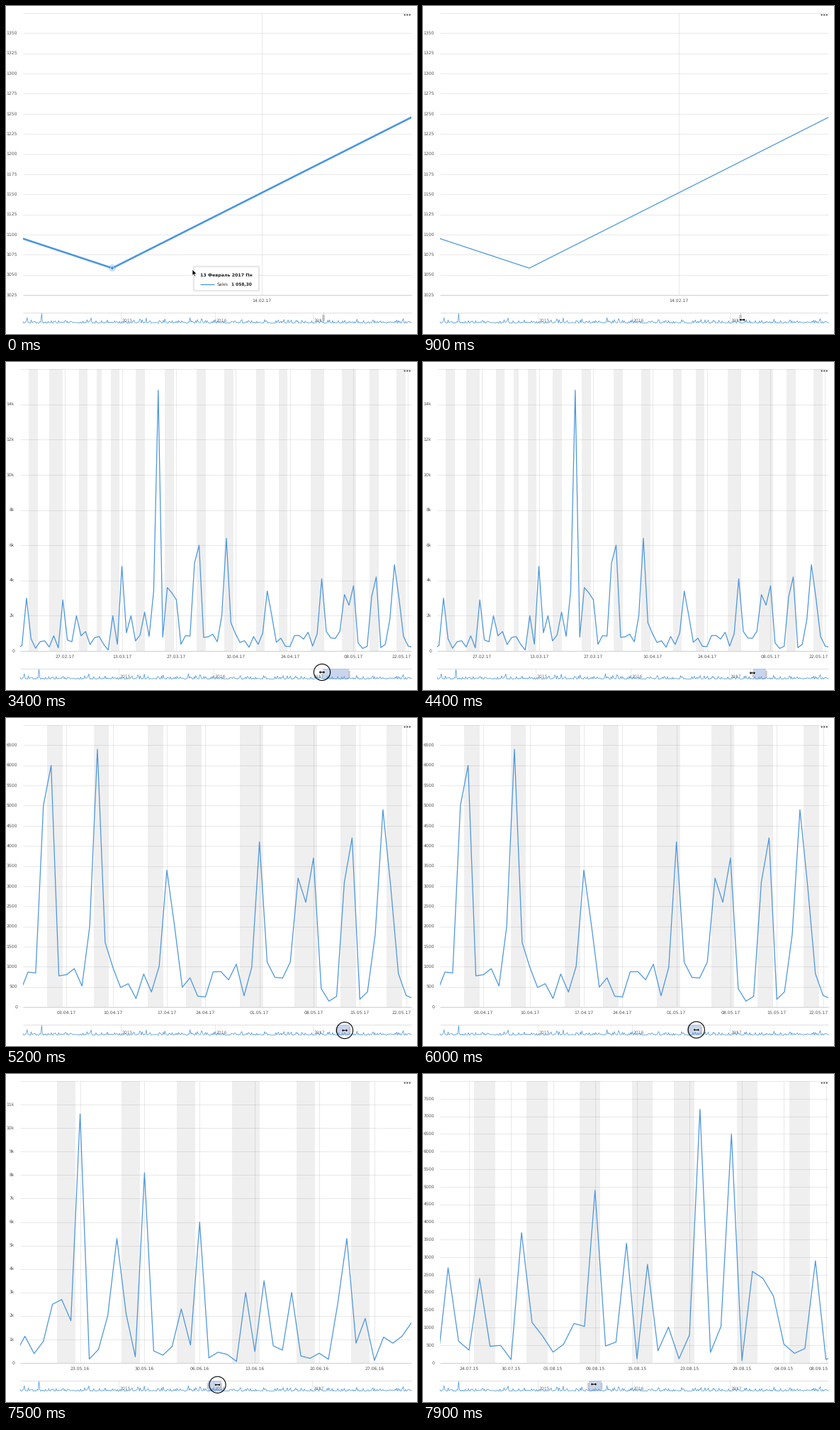
A matplotlib script for the animation above (8000 ms loop, 580x462 px).

```python
import matplotlib.pyplot as plt
import numpy as np
from matplotlib.animation import FuncAnimation
from matplotlib.collections import LineCollection
from matplotlib.patches import Circle, FancyBboxPatch, Polygon, Rectangle

W, H, DPI = 580, 462, 100
FRAMES, STEP = 80, 100
TOP, BASE, RIGHT = 10, 407, 572
NAV_TOP, NAV_BASE = 432, 447
BLUE, GRID, BAND = "#4c96dc", (0, 0, 0, 0.085), "#efefef"
PX = 72 / DPI

plt.rcParams.update({"font.family": "DejaVu Sans", "text.hinting": "no_hinting"})
fig = plt.figure(figsize=(W / DPI, H / DPI), dpi=DPI, facecolor="white")
ax = fig.add_axes([0, 0, 1, 1])


def daily_sales(count, peaks, seed):
    """Quiet seeded days with marked busy ones, peaks in hundreds."""
    values = np.random.default_rng(seed).uniform(50, 1150, count)
    for day, hundreds in peaks.items():
        values[day] = hundreds * 100
    return values


def view(start, left, values, x0, dx, step, rows, ticks, first, low=0,
         gaps=None, mondays=(), holidays=(), kilo=False):
    """One zoom state; ticks, mondays and holidays are point indices."""
    gap = (BASE - TOP) / rows
    gaps = 7 * np.arange(len(ticks)) if gaps is None else gaps
    labels = []
    for days in gaps:
        y, m, d = str(np.datetime64(first) + int(days)).split("-")
        labels.append(f"{d}.{m}.{y[2:]}")
    off = [m - k for m in mondays for k in (1, 2)] + list(holidays)
    return dict(start=start, left=left, low=low, step=step, rows=rows, gap=gap, kilo=kilo,
                x=x0 + dx * np.arange(len(values)),
                y=BASE - (np.array(values) - low) * gap / step,
                ticks=[(x0 + dx * i, s) for i, s in zip(ticks, labels)],
                off=[(x0 + dx * (i - 0.5), x0 + dx * (i + 0.5)) for i in off])


SPRING = daily_sales(88, {
    2: 30, 10: 29, 13: 20, 21: 20, 23: 48, 25: 20, 28: 22, 30: 34, 31: 148,
    33: 36, 34: 33, 35: 29, 39: 50, 40: 60, 45: 20, 46: 64, 47: 16, 55: 34,
    56: 20, 67: 41, 72: 32, 73: 26, 74: 37, 78: 31, 79: 42, 82: 18, 83: 49,
    84: 30, 87: 2}, 3)
JUNE = daily_sales(44, {
    4: 25, 5: 27, 6: 18, 7: 106, 10: 20, 11: 53, 12: 21, 14: 81, 18: 23,
    20: 60, 25: 30, 27: 35, 30: 30, 35: 25, 36: 53, 38: 19, 43: 17}, 8)
AUGUST = daily_sales(39, {
    0: 0, 1: 27, 4: 24, 8: 37, 15: 49, 18: 34, 20: 28, 25: 72, 28: 65, 30: 26,
    31: 24, 32: 19, 36: 29, 37: 1}, 5)
MONDAYS = np.array([5, 10.5, 16, 23, 28.5, 35, 42, 48, 55, 60, 67, 74, 80, 86])
MAY = np.array([67, 74])
LATE = MONDAYS[6:] - 36
JUNE_MONDAYS = [7, 14, 20, 26, 33, 39]

VIEWS = [
    view(0, 24, [1181, 1058.3, 1245.5], -272, 422, 25, 14, [1.5], "2017-02-14", low=1025),
    view(2400, 20, SPRING, 16.1, 6.41, 2000, 8, MONDAYS[1::2], "2017-02-27",
         gaps=14 * np.arange(7), mondays=MONDAYS, holidays=[7.5, 18, *MAY], kilo=True),
    view(4500, 24, SPRING[36:], 20.1, 10.89, 500, 14, LATE, "2017-04-03",
         mondays=LATE, holidays=MAY - 36),
    view(6200, 20, JUNE, 13.7, 12.98, 1000, 12, JUNE_MONDAYS, "2016-05-23",
         mondays=JUNE_MONDAYS, holidays=[26], kilo=True),
    view(7800, 24, AUGUST, 20.6, 14.81, 500, 16, [3, 7, 11, 15, 19, 24, 29, 33, 37],
         "2015-07-24", gaps=[0, 6, 12, 16, 22, 30, 36, 42, 46],
         mondays=[6, 11, 16, 21, 25, 31, 36]),
]

# start, end, x, y, dragged part of the window
MOVES = [
    (0, 600, 451, 444, ""), (800, 1000, 450, 438, ""), (1400, 1900, 486.5, 438, "r"),
    (2200, 3100, 446, 437, ""), (3400, 3800, 473, 437.5, "l"), (4000, 4100, 465, 438, "l"),
    (4400, 5000, 478, 440, ""), (5400, 6200, 355, 439, "lr"), (6900, 7200, 352, 438.5, "lr"),
    (7300, 7700, 245, 437, "lr"), (7700, 7900, 241, 437, "")]
PRESSED = [(1200, 2100), (3400, 4200), (5200, 6200), (6900, 7800)]

nav_u = np.linspace(0, 1, 480)
nav_h = np.clip(np.random.default_rng(14).gamma(1.3, 1.3, nav_u.size), 0.3, 8)
nav_h[round(0.0475 * nav_u.size)] = 14


def gesture(t):
    """Pointer place and window edges at time t."""
    x, y, left, right = 263, 371, 447.5, 448.5
    for start, end, x1, y1, part in MOVES:
        p = np.clip((t - start) / (end - start), 0, 1)
        dx = (x1 - x) * p
        dip = 0 if part else min(abs(x1 - x), 12) * np.sin(np.pi * p)
        left += dx * ("l" in part)
        right += dx * ("r" in part)
        x, y = x + dx, y + (y1 - y) * p + dip
        if p < 1:
            break
    return x, y, left, right


def text(x, y, s, ha="center", size=6.1, color="#555555", **kw):
    ax.text(x, y, s, ha=ha, va="center", fontsize=size * PX, color=color, **kw)


def lines(segments, color=GRID, width=1, z=2):
    ax.add_collection(LineCollection(segments, colors=[color], linewidths=width * PX, zorder=z))


def rect(x0, y0, x1, y1, color, z, alpha=1):
    ax.add_patch(Rectangle((x0, y0), x1 - x0, y1 - y0, fc=color, lw=0, zorder=z, alpha=alpha))


def rounded(x, y, w, h, r, color, z, alpha=1):
    ax.add_patch(FancyBboxPatch((x, y), w, h, boxstyle=f"round,pad=0,rounding_size={r}",
                                fc=color, lw=0, alpha=alpha, zorder=z))


def draw_chart(v, hover):
    left = v["left"]
    for a, b in v["off"]:
        rect(max(a, left), TOP, min(b, RIGHT), BASE, BAND, 1)
    ys = [BASE - i * v["gap"] for i in range(v["rows"] + 1)]
    lines([[(left, y), (RIGHT, y)] for y in ys[1:]])
    lines([[(x, TOP), (x, BASE)] for x, _ in v["ticks"]])
    lines([[(left, BASE), (RIGHT, BASE)]], "#cfcfcf")
    for i, y in enumerate(ys[:-1]):
        value = v["low"] + i * v["step"]
        text(left - 8, y, f"{value // 1000}k" if v["kilo"] and value else str(value), "right")
    for x, label in v["ticks"]:
        text(min(x, 558.5), 415, label)
    curve, = ax.plot(v["x"], v["y"], color=BLUE, lw=(2.6 if hover else 1.25) * PX,
                     solid_joinstyle="round", zorder=4)
    curve.set_clip_path(Rectangle((left, 0), RIGHT - left, H, transform=ax.transData))
    for x in (562.7, 566.2, 569.7):
        ax.add_patch(Circle((x, 12.5), 1.15, fc="#555555", lw=0, zorder=5))


def draw_navigator(left, edges):
    def place(u):
        return left + u * (RIGHT - left)

    years = [(0.2518, "2015"), (0.4945, "2016"), (0.7464, "2017")]
    lines([[(left, NAV_TOP), (RIGHT, NAV_TOP)]], "#e0e0e0")
    lines([[(place(u), NAV_TOP), (place(u), NAV_BASE)] for u, _ in years])
    ax.plot(place(nav_u), NAV_BASE - nav_h, color=BLUE, lw=0.75 * PX, zorder=4)
    for u, year in years:
        text(place(u) + 2, 443, year, "left", color="#777777", zorder=4.5)
    a, b = [place((x - 24) / (RIGHT - 24)) for x in edges]
    rect(a, NAV_TOP, b, NAV_BASE, "#6f93d2", 5, 0.38)
    for x in (a, b):
        rounded(x - 1.4, 435, 2.8, 9, 1, "#bdbdbd", 6, 0.75)


def draw_tooltip():
    ax.add_patch(Circle((150, 369), 5, fc=BLUE, lw=0, alpha=0.3, zorder=5))
    ax.add_patch(Circle((150, 369), 2.3, fc=BLUE, ec="white", lw=0.5 * PX, zorder=6))
    for g in (3, 2, 1):
        rounded(266 - g, 368 - g, 90 + 2 * g, 32 + 2 * g, 2, "black", 7, 0.035)
    rounded(266, 368, 90, 32, 2, "white", 7)
    text(274, 379, "13 Февраль 2017 Пн", "left", 6.3, "#222222", weight="bold", zorder=8)
    lines([[(274, 392), (294, 392)]], BLUE, 1.3, 8)
    text(298, 392, "Sales", "left", 6, "#333333", zorder=8)
    text(347, 392, "1 058,30", "right", 5.9, "#222222", weight="bold", zorder=8)


def draw_pointer(x, y, t):
    if t < 600:
        shape = [(0, 0), (0, 8.6), (1.9, 7), (3.2, 10), (4.6, 9.4), (3.4, 6.5), (6, 6.3)]
    else:
        half = [(-4.6, 0), (-1.8, -3), (-1.8, -1), (1.8, -1), (1.8, -3), (4.6, 0)]
        shape = half + [(-p, -q) for p, q in half[1:-1]]
    ax.add_patch(Polygon([(x + p, y + q) for p, q in shape], fc="black", ec="white",
                         lw=0.7 * PX, zorder=10))
    if any(a <= t < b for a, b in PRESSED):
        ax.add_patch(Circle((x, y), 11.6, fc="none", ec="black", lw=1.1 * PX, zorder=9))


def draw(i):
    t = i * STEP
    ax.clear()
    ax.set(xlim=(0, W), ylim=(H, 0))
    ax.axis("off")
    v = [v for v in VIEWS if v["start"] <= t][-1]
    x, y, *edges = gesture(t)
    hover = t < 300
    draw_chart(v, hover)
    draw_navigator(v["left"], edges)
    if hover:
        draw_tooltip()
    draw_pointer(x, y, t)
    return []


anim = FuncAnimation(fig, draw, frames=FRAMES, interval=STEP, repeat=True,
                     repeat_delay=0, init_func=lambda: draw(0), blit=False)
plt.show()
```
